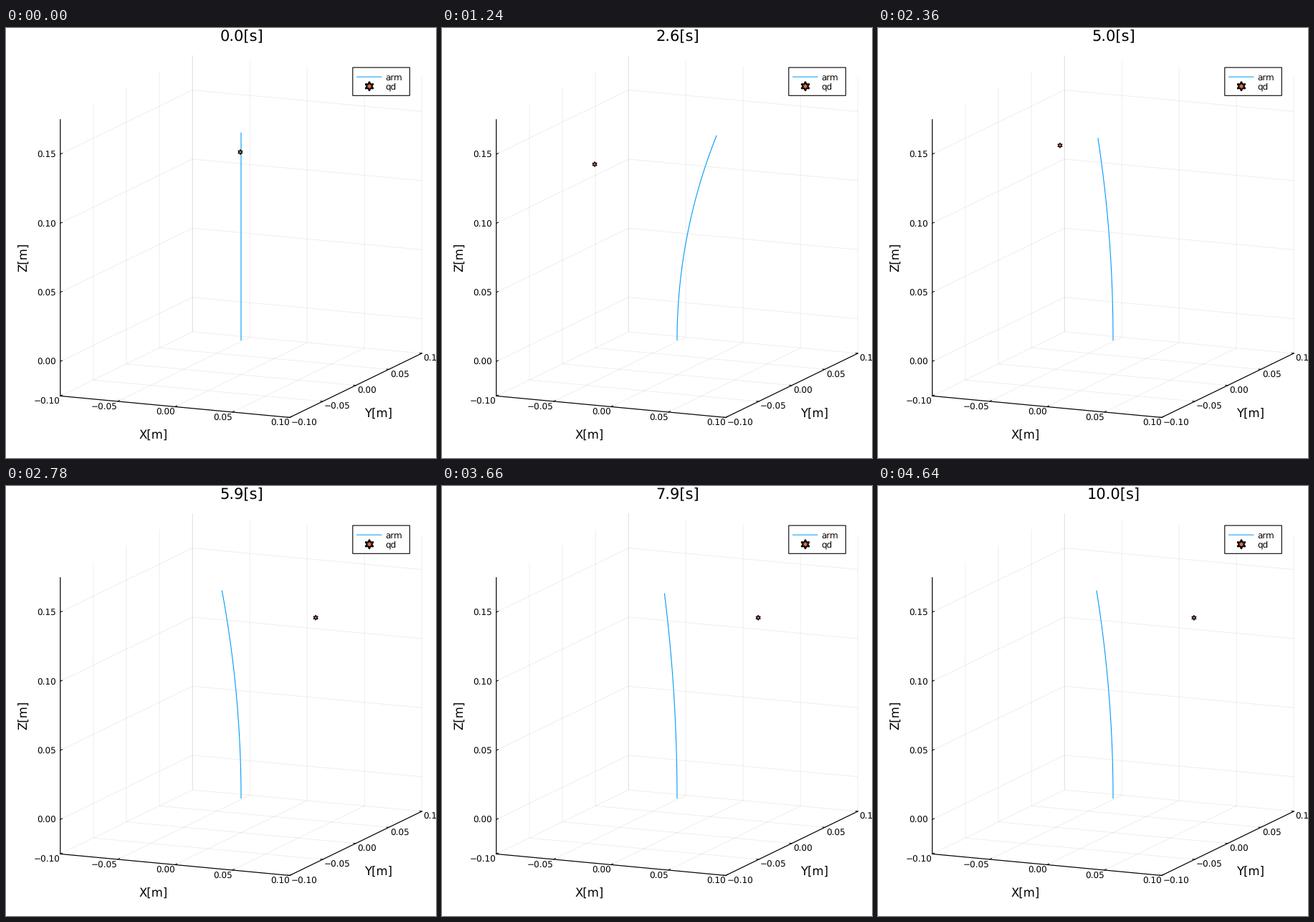
These frames come from a looping animation (600x600 px, 4660 ms). A matplotlib script:

```python
import numpy as np
import matplotlib.pyplot as plt
from matplotlib.animation import FuncAnimation

SIZE, DPI = 600, 100
PX = 72 / DPI                      # points per pixel
BLUE, ORANGE = "#009af9", "#e26f46"
BASE = np.array([328.0, 435.5])    # arm root on screen
LENGTH = 289.2                     # straight arm in pixels
LOW, HIGH = -0.025, 0.175          # z limits
TICKS = (-0.10, -0.05, 0.0, 0.05, 0.10)
Z_TICKS = (0.0, 0.05, 0.10, 0.15)

plt.rcParams.update({"font.family": "DejaVu Sans", "text.hinting": "none",
                     "path.snap": False})
fig = plt.figure(figsize=(SIZE / DPI, SIZE / DPI), dpi=DPI, facecolor="white")
ax = fig.add_axes([0, 0, 1, 1])
ax.set_xlim(0, SIZE)
ax.set_ylim(SIZE, 0)
ax.axis("off")


def project(x, y, z):
    """Orthographic view of a point in metres, in pixels."""
    return np.array([BASE[0] + 1600 * x + 922.5 * y,
                     BASE[1] + 150 * x - 447.5 * y - 1928 * z])


def segment(a, b, width=1.0, **style):
    ax.plot([a[0], b[0]], [a[1], b[1]], lw=width * PX, **style)


def label(x, y, text, size=12, **style):
    return ax.text(x, y, text, fontsize=size * PX, color="black", **style)


def number(v):
    return f"{v:.2f}".replace("-", "\u2212")


def star_points(center, radius):
    angle = np.arange(12) * np.pi / 6
    r = np.where(np.arange(12) % 2, radius * 0.5, radius)
    return np.column_stack([center[0] + r * np.sin(angle),
                            center[1] - r * np.cos(angle)])


def star(center, radius, width, zorder):
    return ax.fill(*star_points(center, radius).T, fc=ORANGE, ec="black",
                   lw=width * PX, joinstyle="miter", zorder=zorder)[0]


def draw_grid():
    style = dict(color="black", alpha=0.065, solid_capstyle="butt", zorder=1)
    for t in TICKS:
        segment(project(t, -0.1, LOW), project(t, 0.1, LOW), **style)
        segment(project(-0.1, t, LOW), project(0.1, t, LOW), **style)
        segment(project(t, 0.1, LOW), project(t, 0.1, HIGH), **style)
        segment(project(-0.1, t, LOW), project(-0.1, t, HIGH), **style)
    for z in Z_TICKS:
        corner = project(-0.1, 0.1, z)
        segment(project(-0.1, -0.1, z), corner, **style)
        segment(corner, project(0.1, 0.1, z), **style)


def draw_axes():
    style = dict(color="black", zorder=2)
    left, front, right = (project(-0.1, -0.1, LOW), project(0.1, -0.1, LOW),
                          project(0.1, 0.1, LOW))
    segment(left, project(-0.1, -0.1, HIGH), 1.2, **style)
    segment(left, front, 1.2, **style)
    segment(front, right, 1.2, **style)
    along_y, along_x = np.array([2.7, -1.3]), np.array([-3.0, -0.3])
    for t in TICKS:
        p = project(t, -0.1, LOW)
        segment(p, p + along_y, **style)
        label(p[0], p[1] + 11.6, number(t), ha="right")
        p = project(0.1, t, LOW)
        segment(p, p + along_x, **style)
        label(p[0] + 2.3, p[1] + 11.2, number(t), ha="left")
    for z in Z_TICKS:
        p = project(-0.1, -0.1, z)
        segment(p, p + along_y, **style)
        label(70.3, p[1] + 4.9, number(z), ha="right")
    label(205.5, 574, "X[m]", 16.5, ha="center")
    label(520, 544, "Y[m]", 16.5, ha="center")
    label(25, 319.5, "Z[m]", 16.5, ha="center", va="center", rotation=90)


def draw_legend():
    ax.fill([483.8, 563.3, 563.3, 483.8], [55.1, 55.1, 94.3, 94.3],
            fc="white", ec="black", lw=1.1 * PX, joinstyle="miter", zorder=5)
    segment((489.5, 68.2), (524, 68.2), color=BLUE, zorder=6)
    star((507, 81.3), 6.4, 2.0, 6)
    label(529.5, 73, "arm", zorder=6)
    label(529.5, 86, "qd", zorder=6)


def goal_position(t):
    """Desired tip: a closed orbit at 3 rad/s."""
    a = 3 * t
    dx = (-115.6 * np.sin(a) - 2.1 * np.cos(a) + 0.4 + 0.6 * np.cos(2 * a)
          + 0.3 * np.sin(2 * a) - 0.8 * np.sin(3 * a))
    dy = -262.3 + 12.7 * np.cos(a) + 3.5 * np.sin(a) - 12.8 * np.cos(2 * a)
    return BASE + (dx, dy)


def arm_curve(t):
    """Circular arc whose tip swings as forced motion plus a decaying mode."""
    a, b, fade = 3 * t, 1.57 * t, np.exp(-0.04 * t)
    dx = 23 * np.sin(a) - 44 * fade * np.sin(b)
    side = (-0.0507 * dx - 3.7 * np.cos(a)
            + fade * (2.6 * np.sin(b) + 3.7 * np.cos(b)))
    rise = LENGTH - 0.0036 * dx ** 2
    bend = max(0.00864 * abs(dx), 1e-3)
    s = np.linspace(0, 1, 50) * bend
    out = (1 - np.cos(s)) / (1 - np.cos(bend))
    up = np.sin(s) / np.sin(bend)
    return BASE[0] + dx * out, BASE[1] + side * out - rise * up


draw_grid()
draw_axes()
draw_legend()
title = label(328.5, 18.3, "", 21, ha="center")
arm, = ax.plot([], [], color=BLUE, lw=1.1 * PX, zorder=3)
goal = star(BASE, 3.5, 1.2, 4)


def step_at(slot):
    """Steps are held for 1, 5 and 1 slots in turn."""
    cycle, rest = divmod(slot, 7)
    return 3 * cycle + (rest > 0) + (rest > 5)


def update(slot):
    t = step_at(slot) / 10
    title.set_text(f"{t:.1f}[s]")
    arm.set_data(*arm_curve(t))
    goal.set_xy(star_points(goal_position(t), 3.5))
    return title, arm, goal


anim = FuncAnimation(fig, update, frames=233, interval=20, repeat=True,
                     repeat_delay=0, blit=False)
plt.show()
```
